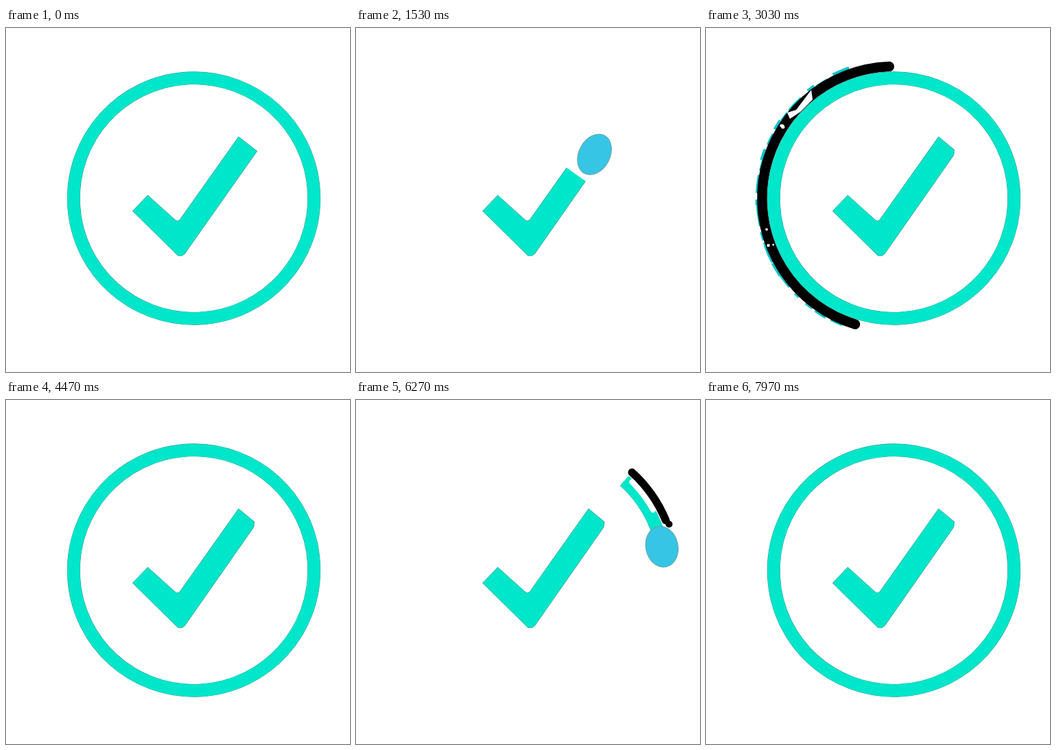
Write an HTML page that moves like this. It is 500x500 px and loops after 8010 ms.

```html
<!DOCTYPE html>
<html lang="en">
<head>
<meta charset="utf-8">
<title>Check mark</title>
<style>
  html, body { margin: 0; width: 100%; height: 100%; overflow: hidden; background: #fff; }
  svg { display: block; width: 100%; height: 100%; }
  .line { fill: none; }
</style>
</head>
<body>
<svg viewBox="0 0 500 500">
  <defs>
    <mask id="reveal" maskUnits="userSpaceOnUse" x="0" y="0" width="500" height="500">
      <path id="wipe" class="line" d="M177 236L252 307L380 126" stroke="#fff" stroke-width="70"
        pathLength="1" stroke-dasharray="1 2"/>
    </mask>
  </defs>
  <g mask="url(#reveal)">
    <path id="check" fill="#00e6cb" stroke="#3d8f84" stroke-width=".7"/>
  </g>
  <g id="specks" class="line"></g>
  <path id="shade" class="line" stroke="#000" stroke-linecap="round"/>
  <g id="nicks" fill="#fff">
    <path d="M118 123L131 119L153 90L155 104L137 122L122 132Z"/>
  </g>
  <path id="rim" class="line" stroke="#3d8f84" stroke-width="18.8"/>
  <path id="ring" class="line" stroke="#00e6cb" stroke-width="18"/>
  <path id="bite" class="line" stroke="#fff" stroke-width="8" stroke-linecap="round"/>
  <circle id="knob" r="5"/>
  <ellipse id="ball" fill="#36c5e4" stroke="#6aa5a4"/>
</svg>
<script>
const LOOP = 8010, CYCLE = 4000;
const CX = 273, CY = 247.5, R = 175, BALL = 26;
const CLEAR = 560, RING_START = 2100, RING_END = 2980, SHADE_END = 3200;
const ARC_START = -48, SHADE_SWEEP = 316;
const el = Object.fromEntries([...document.querySelectorAll('[id]')].map(e => [e.id, e]));

const linear = s => s;
const easeOut = s => 1 - (1 - s) ** 3;
const sweep = s => s ** 1.53;
const progress = (t, from, to) => Math.min(1, Math.max(0, (t - from) / (to - from)));

// The free flight: a jump, a fall, a stroke up the check and a hook onto the ring
const flight = [
  { end: 980, path: [[46, 412], [77, 116], [107, 116]], ease: linear },
  { end: 1400, path: [[107, 116], [137, 116], [255, 355]], ease: linear },
  { end: 1830, path: [[255, 355], [324, 226], [393, 97]], ease: easeOut },
  { end: RING_START, path: [[393, 97], [400, 75], [407, 135]], ease: linear }
];
flight.forEach((leg, i) => { leg.start = i ? flight[i - 1].end : CLEAR; });

function polar(r, deg) {
  const a = deg * Math.PI / 180;
  return [CX + r * Math.cos(a), CY + r * Math.sin(a)];
}

function arc(r, from, to) {
  if (to - from < 0.1) return '';
  const leg = a => `A${r} ${r} 0 0 1 ${polar(r, a)}`;
  return `M${polar(r, from)}${leg((from + to) / 2)}${leg(to)}`;
}

const ringAngle = t => -40 + 352 * sweep(progress(t, RING_START, RING_END));
const shadeHead = t => ARC_START + SHADE_SWEEP * sweep(progress(t, RING_START, RING_END));
const shadeTail = t => ARC_START + SHADE_SWEEP * progress(t, 2400, SHADE_END) ** 3;

function ballAt(t) {
  if (t >= RING_START) return polar(R, ringAngle(t));
  const { start, end, path: [a, b, c], ease } = flight.find(leg => t < leg.end);
  const s = ease(progress(t, start, end)), q = 1 - s;
  return a.map((v, i) => v * q * q + 2 * b[i] * q * s + c[i] * s * s);
}

const show = (e, on) => e.setAttribute('visibility', on ? 'visible' : 'hidden');
const set = (e, attrs) => { for (const k in attrs) e.setAttribute(k, attrs[k]); };

function add(parent, tag, attrs) {
  const e = document.createElementNS('http://www.w3.org/2000/svg', tag);
  set(e, attrs);
  parent.append(e);
  return e;
}

let seed = 7;
function random(min, max) {
  seed = seed * 16807 % 2147483647;
  return min + (max - min) * seed / 2147483647;
}

// Ragged flecks along the outside of the shade, and small holes in it
const flecks = [];
for (let a = 108; a < 244; a += random(3, 9)) {
  const e = add(el.specks, 'path', {
    d: arc(random(196, 199.5), a, a + random(2, 8)),
    stroke: '#08c5cc', 'stroke-width': random(3, 7)
  });
  flecks.push({ e, a });
}
for (let i = 0; i < 6; i++) {
  const [cx, cy] = polar(random(185, 196), random(i % 2 ? 158 : 210, i % 2 ? 170 : 222));
  add(el.nicks, 'circle', { cx, cy, r: random(1.5, 3) });
}

function drawBall(t) {
  const r = BALL * progress(t, 540, 600) * (1 - progress(t, 2950, 3000));
  show(el.ball, r > 0.2);
  const [x, y] = ballAt(t), [px, py] = ballAt(t - 5);
  const dx = x - px, dy = y - py, speed = Math.hypot(dx, dy) / 5;
  const stretch = Math.min(0.2, speed * speed * 0.25);
  const turn = Math.atan2(dy, dx) * 180 / Math.PI;
  set(el.ball, {
    rx: r * (1 + stretch), ry: r * (1 - stretch * 0.65),
    transform: `translate(${x} ${y}) rotate(${turn})`
  });
}

function drawCheck(t, sharp) {
  const tip = sharp ? 'L365 179' : 'L361 177L360 185';
  const shown = t < CLEAR ? 1 : progress(t, 1180, 1700);
  el.check.setAttribute('d', `M206 243L246 279Q250 282 253 278L338 158${tip}L260 328L256 331L250 331L184 266Z`);
  el.wipe.setAttribute('stroke-dashoffset', 1 - shown);
  show(el.check, shown > 0);
}

function drawShade(t) {
  const on = t >= RING_START && t < SHADE_END;
  const head = shadeHead(t), tail = shadeTail(t);
  set(el.shade, {
    d: on ? arc(191.5, tail, head) : '',
    'stroke-width': 11.5 + 3 * progress(t, 2300, RING_END)
  });
  for (const { e, a } of flecks) show(e, on && a > tail && a < head);
  show(el.nicks, on && t > RING_END && tail < 158);

  const early = on && t < 2480;
  el.bite.setAttribute('d', early ? arc(181.5, -45, Math.min(-29, head)) : '');
  const [cx, cy] = polar(194, head + 2);
  set(el.knob, { cx, cy });
  show(el.knob, early);
}

function draw(time) {
  const t = time % CYCLE;
  const whole = t < CLEAR || t >= RING_END;
  const end = whole ? ARC_START + 360.2 : t < RING_START ? ARC_START : ringAngle(t);
  for (const e of [el.ring, el.rim]) e.setAttribute('d', arc(R, ARC_START, end));
  drawCheck(t, time < 400);
  drawShade(t);
  drawBall(t);
}

const start = performance.now();
function tick() {
  draw((performance.now() - start) % LOOP);
  requestAnimationFrame(tick);
}
tick();
</script>
</body>
</html>
```
